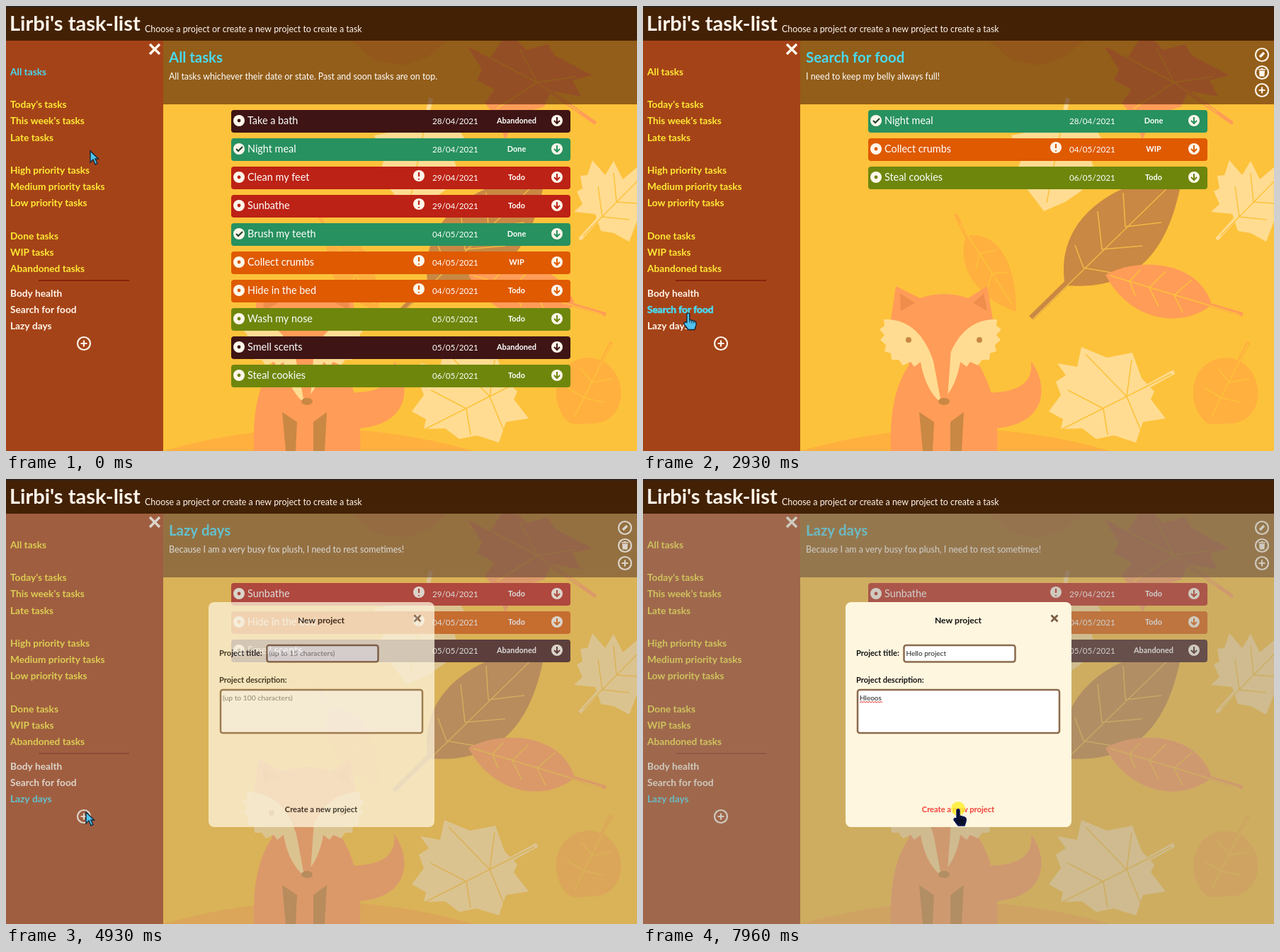
An HTML page with a canvas for the animation above (8000 ms loop, 891 px wide and 629 px high).

```html
<!DOCTYPE html>
<html lang="en">
<head>
<meta charset="utf-8">
<title>Task list</title>
<style>
html, body { margin: 0; width: 100%; height: 100%; overflow: hidden; background: #fdc23b; }
canvas { display: block; }
</style>
</head>
<body>
<canvas width="891" height="629"></canvas>
<script>
const LOOP = 8000;
const canvas = document.querySelector('canvas');
const screen = canvas.getContext('2d');
const newLayer = () => canvas.cloneNode().getContext('2d');
const scenery = newLayer(), dialog = newLayer();
let c = screen;

const YELLOW = '#fdc23b', AMBER = '#ffb03f', ORANGE = '#ff9c58', PALE = '#ffdc92', BROWN = '#c98843';
const WHITE = '#fff6ea', LEMON = '#ffea35', CYAN = '#49d9f0';
const DARK = '#3e1414', GREEN = '#27915f', RED = '#bc2215', RUST = '#df5a00', OLIVE = '#6e860c';

// name, date, status, colour, late
const tasks = [
  ['Take a bath', '28/04/2021', 'Abandoned', DARK],
  ['Night meal', '28/04/2021', 'Done', GREEN],
  ['Clean my feet', '29/04/2021', 'Todo', RED, true],
  ['Sunbathe', '29/04/2021', 'Todo', RED, true],
  ['Brush my teeth', '04/05/2021', 'Done', GREEN],
  ['Collect crumbs', '04/05/2021', 'WIP', RUST, true],
  ['Hide in the bed', '04/05/2021', 'Todo', RUST, true],
  ['Wash my nose', '05/05/2021', 'Todo', OLIVE],
  ['Smell scents', '05/05/2021', 'Abandoned', DARK],
  ['Steal cookies', '06/05/2021', 'Todo', OLIVE]
];

const menu = [
  ['All tasks', 94], ["Today's tasks", 140], ["This week's tasks", 163], ['Late tasks', 187],
  ['High priority tasks', 233], ['Medium priority tasks', 256], ['Low priority tasks', 279],
  ['Done tasks', 326], ['WIP tasks', 349], ['Abandoned tasks', 372],
  ['Body health', 407], ['Search for food', 430], ['Lazy days', 453]
];

const onTop = ' Past and soon tasks are on top.';
// start time, menu entry, description, visible tasks
const views = [
  [0, 0, 'All tasks whichever their date or state.' + onTop, [0, 1, 2, 3, 4, 5, 6, 7, 8, 9]],
  [700, 4, 'All tasks that has a high priority.' + onTop, [2, 3, 5]],
  [1130, 5, 'All tasks that has a medium priority.' + onTop, [1, 4, 6]],
  [1620, 8, 'All tasks that are in progress.' + onTop, [5]],
  [2600, 11, 'I need to keep my belly always full!', [1, 5, 9]],
  [3470, 12, 'Because I am a very busy fox plush, I need to rest sometimes!', [3, 6, 8]]
];

// time, x, y
const path = [
  [0, 119, 205], [60, 119, 205], [150, 112, 182], [300, 112, 182], [600, 70, 234], [900, 70, 234],
  [1010, 66, 254], [1300, 66, 254], [1500, 60, 341], [1690, 60, 341], [2000, 62, 427], [2230, 60, 429],
  [2380, 58, 422], [2530, 64, 434], [2920, 64, 434], [3240, 60, 447], [3470, 60, 447], [3800, 111, 474],
  [4160, 111, 474], [4620, 113, 471], [5000, 113, 471], [5230, 195, 408], [5420, 400, 262], [5490, 413, 251],
  [6700, 413, 251], [6950, 434, 328], [7560, 434, 328], [7860, 445, 467], [LOOP, 445, 467]
];
const clicks = [[580, 700], [1050, 1150], [1500, 1640], [2500, 2600], [3380, 3470], [3800, 4120],
  [5480, 5620], [6950, 7060], [7900, LOOP]];

function text(str, x, y, size, color = '#fff', weight = 400, align = 'left') {
  c.font = `${weight} ${size}px Lato, "Open Sans", sans-serif`;
  c.textAlign = align;
  c.textBaseline = 'middle';
  c.fillStyle = color;
  c.fillText(str, x, y);
  return c.measureText(str).width;
}
function fill(color, d) {
  c.fillStyle = color;
  c.fill(new Path2D(d));
}
function line(color, width, d) {
  c.strokeStyle = color;
  c.lineWidth = width;
  c.stroke(new Path2D(d));
}
function box(x, y, w, h, r, color, border) {
  c.beginPath();
  c.roundRect(x, y, w, h, r);
  c.fillStyle = color;
  c.fill();
  if (border) {
    c.strokeStyle = border;
    c.lineWidth = 2.5;
    c.stroke();
  }
}
function disc(x, y, r, color, ry = r) {
  c.beginPath();
  c.ellipse(x, y, r, ry, 0, 0, 7);
  c.fillStyle = color;
  c.fill();
}
function ring(x, y, color) {
  c.beginPath();
  c.arc(x, y, 9, 0, 7);
  c.strokeStyle = color;
  c.lineWidth = 2.2;
  c.stroke();
}
function plus(x, y, color) {
  ring(x, y, color);
  line(color, 2.2, `M${x - 4.5} ${y}h9M${x} ${y - 4.5}v9`);
}

function drawLeaves() {
  fill(AMBER, 'M488 49H622L596 72 560 84 520 76Z');
  // maples
  fill(PALE, 'M520 183L545 178 556 160 580 150 600 165 630 150 640 175 655 200 632 215 640 240 618 262 596 277 566 290 545 262 525 240 535 215Z');
  line(PALE, 6, 'M600 130L591 172');
  line(YELLOW, 1.5, 'M592 165L570 278M584 205L545 190M584 205L632 190M577 240L545 228M577 240L618 245');
  fill(ORANGE, 'M652 58L685 72 700 49H722L735 62 765 54 775 70 828 98 800 105 812 128 770 120 760 142 735 150 715 165 705 190 695 160 676 137 690 118 665 105 672 90Z');
  line(ORANGE, 5, 'M750 108L833 166');
  line(YELLOW, 1.5, 'M810 150L750 108 668 65M750 108L725 60M750 108L693 145M750 108L805 100');
  fill(PALE, 'M802 291L814 280 806 262 814 258 811 240 821 239 828 218 846 239 858 219 871 245 891 228V304L880 333 858 321 840 318 832 294Z');
  line(PALE, 5, 'M810 330L850 286');
  line(YELLOW, 1.5, 'M815 325L891 248M842 298L836 255M842 298L880 302M862 277L858 236M862 277L891 279');
  fill(PALE, 'M619 482L655 497 691 490 704 526 722 545 717 556 738 583 706 588 696 617 665 607 640 612 620 597 590 598 593 584 573 573 590 550 583 531 597 522 585 505 613 510Z');
  line(PALE, 6, 'M690 550L750 517');
  line(YELLOW, 1.6, 'M746 520L580 604M683 552L625 492M683 552L708 612M683 552L690 500M650 569L600 543M650 569L656 606');

  // simple leaves
  line(AMBER, 5, 'M441 294L458 328');
  fill(AMBER, 'M456 325C490 318 526 345 527 432C482 418 440 375 456 325Z');
  line(YELLOW, 1.6, 'M448 308L521 421M475 350L470 372M475 350L498 345M493 378L486 400M493 378L516 376');
  line(BROWN, 8, 'M548 441L602 388');
  fill(BROWN, 'M596 395C580 305 660 245 762 238C748 320 715 405 596 395Z');
  line('#efb947', 1.6, 'M550 443L753 245M648 344L642 290M648 344L705 339M681 312L678 264M681 312L732 306M622 370L610 338M622 370L662 377');
  line(ORANGE, 5, 'M796 421L847 436');
  fill(ORANGE, 'M653 380C698 355 784 358 803 422C765 455 690 450 653 380Z');
  line(YELLOW, 1.6, 'M660 381L842 436M715 398L738 375M715 398L728 425M750 409L775 387M750 409L762 433M687 389L702 373M687 389L695 409');
  line(AMBER, 5, 'M832 520L855 475');
  fill(AMBER, 'M797 590C765 566 770 500 822 497C882 499 886 595 822 590Q808 592 797 590Z');
  line(YELLOW, 1.6, 'M854 478L803 580M828 532L812 513M828 532L856 527M817 554L793 540M817 554L843 560');
}

function drawFox() {
  fill(AMBER, 'M222 629Q440 566 660 629Z');
  fill(ORANGE, 'M470 547C520 548 552 540 548 502C575 540 568 592 497 597Z');
  fill(ORANGE, 'M385 495C350 535 349 590 350 629H500C502 590 497 535 466 495Z');
  fill(ORANGE, 'M357 396L391 413Q425 401 459 413L486 396 494 443Q490 500 432 558H418Q360 500 350 443Z');
  fill('#ef8d4c', 'M363 406L384 420 364 431ZM481 406L466 420 486 431Z');
  const cheek = 'M340 443C382 441 414 475 421 560C407 551 396 528 392 503L383 510 378 503 367 508 361 500 351 500 350 491 341 488 343 479 335 472 341 465 334 457 341 452Z';
  fill(PALE, cheek);
  c.save();
  c.translate(850, 0);
  c.scale(-1, 1);
  c.translate(10, 0);
  fill(PALE, cheek);
  c.restore();
  fill(PALE, 'M418 540L425 562 432 540Z');
  fill(ORANGE, 'M404 470H436L430 555H420Z');
  disc(375, 472, 4, BROWN);
  disc(475, 472, 4, BROWN);
  disc(425, 559, 8, BROWN, 5);
  fill(BROWN, 'M390 574L411 588 409 629H395ZM453 574L434 588V629H450Z');
}

function drawScenery() {
  c = scenery;
  c.lineJoin = 'round';
  box(0, 0, 891, 629, 0, YELLOW);
  drawLeaves();
  drawFox();
  box(222, 49, 669, 90, 0, 'rgba(67,20,0,.57)');
  box(0, 49, 222, 580, 0, '#a54318');
  box(0, 0, 891, 49, 0, '#432105');
  box(0, 0, 891, 2, 0, '#30241d');
  text("Lirbi's task-list", 5, 26, 29, WHITE, 700);
  text('Choose a project or create a new project to create a task', 196, 33, 12.4, WHITE);
  line(WHITE, 3.5, 'M203 54l14 14m0 -14l-14 14');
  line('#84240c', 2, 'M46 388H174');
  c = screen;
}

function drawRow([name, date, status, color, late], y) {
  box(318, y, 479, 32, 4, color);
  disc(329, y + 15, 8, WHITE);
  if (status === 'Done') line('#173c2c', 2, `M325 ${y + 15}l3 3 6 -6`);
  else disc(329, y + 15, 2.4, color);
  text(name, 341, y + 16, 14.4);
  if (late) {
    disc(583, y + 13, 8, WHITE);
    line(color, 2.2, `M583 ${y + 8}v6m0 3v1.5`);
  }
  text(date, 602, y + 16, 11.7);
  text(status, 721, y + 16, 10.9, '#fff', 700, 'center');
  disc(778, y + 15, 8, WHITE);
  line(color, 2, `M778 ${y + 10}v9m-4 -4l4 4 4 -4`);
}

function drawPage(view, hover) {
  const [, entry, description, shown] = view;
  menu.forEach(([label, y], i) => {
    const color = i === entry ? CYAN : i < 10 ? LEMON : WHITE;
    text(label, 6, y, 13.7, color, 700);
    if (i === hover) {
      c.strokeStyle = color;
      c.lineWidth = .7;
      c.strokeText(label, 6, y);
    }
  });
  plus(110, 477, hover === 'add' ? LEMON : WHITE);
  text(menu[entry][0], 230, 74, 20.4, CYAN, 700);
  text(description, 230, 100, 12.4);
  if (entry > 9) {
    ring(874, 69, WHITE);
    line(WHITE, 3.5, 'M871 72l6 -6');
    ring(874, 94, WHITE);
    fill(WHITE, 'M869 89h3l1 -1h2l1 1h3v1.5h-10ZM870 91.5h8l-.6 8h-6.8Z');
    plus(874, 119, WHITE);
  }
  shown.forEach((id, i) => drawRow(tasks[id], 147 + 40 * i));
}

function field(value, hint, x, y, focused) {
  const width = text(value || hint, x, y, value ? 10 : 10.3, value ? '#222' : '#777');
  const end = x + (value ? width + 1 : 0);
  if (focused) line('#111', 1, `M${end + .5} ${y - 7}v14`);
  return width;
}
const typed = (str, t, start, step) => str.slice(0, Math.max(0, Math.floor((t - start) / step) + 1));

function drawDialog(t, pointer) {
  const title = typed('Hello project', t, 5700, 64);
  const note = typed('Hleoos', t, 7100, 80);
  const border = '#8a6a4c';
  c = dialog;
  c.clearRect(0, 0, 891, 629);
  box(286, 174, 319, 318, 8, '#fff6df');
  text('New project', 445, 200, 12.1, '#111', 700, 'center');
  line('#7a5c43', 2.8, 'M576.5 192.5l9 9m0 -9l-9 9');
  text('Project title:', 301, 247, 11.1, '#111', 700);
  box(368.5, 235, 157, 23.5, 3, '#fff', border);
  field(title, '(up to 15 characters)', 371.5, 247, t > 5480 && t < 6950);
  text('Project description:', 301, 285, 11, '#111', 700);
  box(303, 298, 285, 61, 3, '#fff', border);
  const width = field(note, '(up to 100 characters)', 306, 310, t >= 6950 && t < 7650);
  if (note) {
    let wave = 'M306 316';
    for (let x = 0; x < width - 2; x += 4) wave += 'l2 -1.5 2 1.5';
    line('#e33', 1, wave);
  }
  text('Create a new project', 445, 468, 11.1, pointer ? '#f4403a' : '#111', 700, 'center');
  if (t > 5480 && t < 5700) {
    c.shadowColor = 'rgba(0,0,0,.4)';
    c.shadowBlur = 4;
    box(366, 261, 161, 41, 3, '#292a2e');
    c.shadowBlur = 0;
    text('dd', 376, 282, 11, '#fff', 600);
  }
  c = screen;
}

function drawCursor(t, x, y, kind) {
  const pressed = clicks.some(([from, to]) => t >= from && t < to);
  if (pressed) disc(x, y - 1, 10, t > 5000 ? 'rgba(255,238,40,.8)' : 'rgba(240,190,0,.75)');
  c.save();
  c.translate(x, y);
  if (kind === 'beam') {
    line('#3a3600', 1.6, 'M-4 -7H4M0 -7V8M-4 8H4');
  } else {
    const shape = kind === 'hand'
      ? 'M-2 1Q0 -2 2 1V9L9 11Q12 12 11 17L9 23H0L-6 15Q-6 11 -2 13Z'
      : 'M0 0V16L4 12 7 19 10 17.500 7 11H11.500Z';
    fill(!pressed ? '#4fc3ee' : t > 7900 ? '#0a0f2c' : '#3a8ade', shape);
    line(pressed ? '#0a1560' : '#16283a', 1.4, shape);
    if (kind === 'hand') line('#16283a', 1, 'M2 9v4M5 10v4M8 11v3');
  }
  c.restore();
}

function position(t) {
  const i = path.findIndex(key => key[0] > t);
  const [t0, x0, y0] = path[i - 1], [t1, x1, y1] = path[i];
  const k = (t - t0) / (t1 - t0);
  return [x0 + (x1 - x0) * k, y0 + (y1 - y0) * k];
}

function draw(t) {
  const [x, y] = position(t);
  const fade = Math.min(1, Math.max(0, (t - 4590) / 460));
  let hover = -1, kind = 'arrow';
  if (!fade && x < 222) {
    hover = Math.hypot(x - 110, y - 477) < 11 ? 'add' : menu.findIndex(item => Math.abs(item[1] - y) < 11.6);
    if (hover !== -1) kind = 'hand';
  }
  const onButton = fade && Math.abs(y - 468) < 10 && x > 390;
  if (onButton) kind = 'hand';
  else if (x > 303 && (Math.abs(y - 247) < 13 || Math.abs(y - 328) < 31)) kind = 'beam';

  c.drawImage(scenery.canvas, 0, 0);
  drawPage(views.findLast(view => view[0] <= t), hover);
  if (fade) {
    drawDialog(t, onButton);
    c.globalAlpha = fade;
    box(0, 49, 891, 580, 0, 'rgba(151,148,140,.46)');
    c.drawImage(dialog.canvas, 0, 0);
    c.globalAlpha = 1;
  }
  drawCursor(t, x, y, kind);
}

drawScenery();
const start = performance.now();
function tick() {
  draw((performance.now() - start) % LOOP);
  requestAnimationFrame(tick);
}
tick();
</script>
</body>
</html>
```
